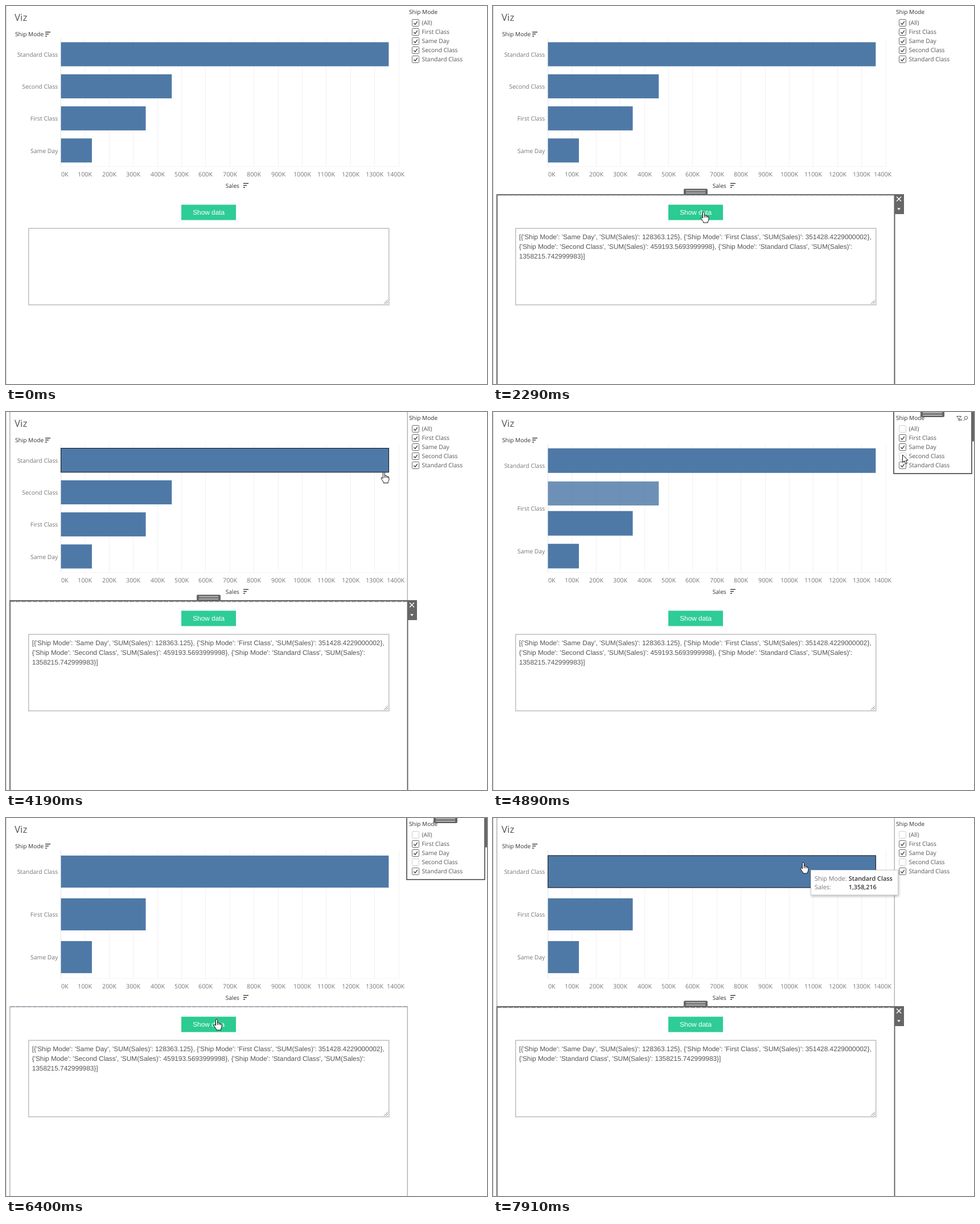
Recreate the animation shown at these times as an HTML page. Size 845x663 px, loop 8 s.

```html
<!DOCTYPE html>
<html lang="en">
<head>
<meta charset="utf-8">
<title>Viz</title>
<style>
  html, body { margin: 0; height: 100%; overflow: hidden; background: #fff; }
  svg { display: block; width: 845px; height: 663px; cursor: default; }
  text { font: 10.4px "Open Sans", "Noto Sans", sans-serif; fill: #767676; text-rendering: geometricPrecision; white-space: pre; }
  .head { font-size: 10.1px; font-weight: 500; fill: #333; }
  .title { font-size: 17px; fill: #555; }
  .axis { font-size: 10.7px; }
  .item { fill: #555; }
  .tip { font-size: 10.8px; }
  .value { font-size: 10.8px; font-weight: 600; fill: #333; }
  .ui { font: 11.85px "Liberation Sans", Arial, sans-serif; fill: #555; }
  .button { fill: #fff; }
</style>
</head>
<body>
<svg viewBox="0 0 845 663"><g id="base"></g><g id="live"></g></svg>
<script>
const LOOP = 8000;
const BAR = '#4e79a7', DARK = '#5c5c5c';
const AXIS_X = 96.5, PER_100K = 42.4, ROWS_TOP = 56.5, ROWS_HEIGHT = 225;

const SELECT_TEXT_PANE = 2170, SHOW_ALL = 2270, UNCHECK = 4750, RELABEL = 4790;
const SHRINK_START = 4800, SHRINK_END = 5300, RESELECT_TEXT_PANE = 6820, SHOW_FILTERED = 6920;
const TOOLTIP = 7860;

const sales = [
  ['Standard Class', 1358215.743], ['Second Class', 459193.569],
  ['First Class', 351428.423], ['Same Day', 128363.125]
];
const removed = 1;
const filterItems = ['(All)', 'First Class', 'Same Day', 'Second Class', 'Standard Class'];
const allRows = [
  "[{'Ship Mode': 'Same Day', 'SUM(Sales)': 128363.125}, {'Ship Mode': 'First Class', 'SUM(Sales)': 351428.4229000002},",
  "{'Ship Mode': 'Second Class', 'SUM(Sales)': 459193.5693999998}, {'Ship Mode': 'Standard Class', 'SUM(Sales)':",
  "1358215.742999983}]"
];
const filteredRows = [allRows[0], "{'Ship Mode': 'Standard Class', 'SUM(Sales)': 1358215.742999983}]"];

// Pointer stops: time, x, y, and whether the move towards it is linear
const stops = [
  [770, 1, 170], [1050, 468, 527], [1260, 468, 527], [1900, 370, 361],
  [3090, 370, 361], [3460, 546, 174], [3700, 546, 174], [4490, 719.5, 73],
  [4510, 719.5, 73], [4530, 719.5, 75], [5280, 719.5, 75], [5490, 526, 216, true],
  [5510, 482, 229, true], [5610, 482, 229], [5670, 416, 245], [5880, 416, 245],
  [6400, 370, 353], [7610, 370, 353], [7910, 545, 78], [LOOP, 545, 78]
];

const pointers = {
  arrow: `<path d="M0 0V13.6L3.2 10.7L5.5 16L8 15L5.7 9.8H9.7Z" fill="#fff" stroke="#111"/>`,
  hand: `<path d="M-1.5 1.5Q-1.5 0 0 0T1.5 1.5V6Q4 5 4.3 7Q6.5 6.2 6.8 8Q9 7.6 9 9.5V13Q9 15 7.5 17V19H-.5V17.5L-4.3 12Q-5.5 9.7-3.8 9.5Q-2.8 9.5-1.5 11Z" fill="#fff" stroke="#111"/>
    <path d="M1.5 6V10M4.2 7V10M6.8 8V10.5" stroke="#111"/>`,
  beam: `<path d="M-3-8H3M0-8V8M-3 8H3" stroke="#333"/>`
};

const clamp = u => Math.max(0, Math.min(1, u));
const mix = (a, b, u) => a + (b - a) * u;
const smooth = u => u * u * (3 - 2 * u);
const easeInOut = u => u < .5 ? 2 * u * u : 1 - 2 * (1 - u) ** 2;
const inside = (p, x0, y0, x1, y1) => p && p.x >= x0 && p.x <= x1 && p.y >= y0 && p.y <= y1;

const text = (x, y, str, cls = '', anchor = 'start') =>
  `<text x="${x}" y="${y}" class="${cls}" text-anchor="${anchor}">${str}</text>`;
const rect = (x, y, w, h, fill, more = '') =>
  `<rect x="${x}" y="${y}" width="${w}" height="${h}" fill="${fill}" ${more}/>`;
const line = (d, color, width = 1, more = '') =>
  `<path d="${d}" fill="none" stroke="${color}" stroke-width="${width}" ${more}/>`;
const sortIcon = (x, y) => line(`M${x} ${y}h9m-9 3.5h6m-6 3.5h3`, '#444', 1.4);

function pointerAt(t) {
  if (t < stops[0][0]) return null;
  const i = stops.findIndex(s => s[0] > t);
  const [t0, x0, y0] = stops[i - 1], [t1, x1, y1, linear] = stops[i];
  const u = (t - t0) / (t1 - t0), e = linear ? u : smooth(u);
  return { x: mix(x0, x1, e), y: mix(y0, y1, e) };
}

function barsAt(t) {
  const u = clamp((t - SHRINK_START) / (SHRINK_END - SHRINK_START)), p = easeInOut(u);
  const pitch = n => ROWS_HEIGHT / n;
  return sales.map(([, amount], i) => {
    const start = pitch(4) * (i + .5);
    const end = i === removed ? start + 30 : pitch(3) * (i - (i > removed) + .5);
    const h = i === removed ? pitch(4) * .75 : mix(pitch(4), pitch(3), p) * .75;
    return {
      x: AXIS_X, y: ROWS_TOP + mix(start, end, p) - h / 2, h,
      w: amount / 1e5 * PER_100K, alpha: i === removed ? 1 - u : 1
    };
  });
}

function rowLabels(t) {
  const names = sales.map(s => s[0]).filter((_, i) => t < RELABEL || i !== removed);
  const pitch = ROWS_HEIGHT / names.length;
  return names.map((n, i) => text(91.3, ROWS_TOP + pitch * (i + .5) + 4.3, n, '', 'end')).join('');
}

function checkList(t) {
  return filterItems.map((name, i) => {
    const y = 23.5 + 16 * i, on = t < UNCHECK || (i !== 0 && i !== 3);
    return rect(713.5, y, 12, 12, '#fff', `rx="1" stroke="${on ? '#6a6a6a' : '#cfcfcf'}"`) +
      (on ? line(`M716.3 ${y + 6.2}l2.5 2.7 4-5.6`, '#444', 1.4) : '') +
      text(730.5, y + 9.8, name, 'item');
  }).join('');
}

const hoverFrame = (x, y, w, h) => rect(x, y, w, h, 'none', 'stroke="#b3b3b8" stroke-width="1.5"');
const splitLine = y => line(`M7 ${y}H705`, '#9292a0', 1.2, 'stroke-dasharray="8 2"');
const grip = (x, y) => rect(x, y, 42, 11, '#666', 'rx="2"') +
  line(`M${x + 4} ${y + 3.5}h34m-34 4h34`, '#fff', 1.2);

const textPaneSelection = () =>
  rect(7, 331, 698.5, 340, 'none', `stroke="${DARK}" stroke-width="1.8"`) + grip(335, 320.5) +
  rect(705, 330, 17, 35, '#666') + line('M709 334.5l8 8m0-8l-8 8', '#fff', 1.4) +
  '<path d="M710 354.5h6l-3 3.5z" fill="#fff"/>';

const filterSelection = () =>
  rect(704, -5, 137, 113, 'none', `stroke="${DARK}" stroke-width="1.8"`) + grip(751, -2) +
  rect(842, -1, 4, 52.5, '#666');

const filterIcons = () =>
  line('M814.5 7.5h8l-3 3.7v4l-2-1.6v-2.4zM820.5 12l3.5 3.5m0-3.5l-3.5 3.5M829.5 12.5l-3 3', '#555') +
  '<circle cx="831" cy="10.3" r="2.7" fill="none" stroke="#555"/>';

const tooltip = () =>
  rect(558.5, 91.5, 153, 43.5, '#fff', 'stroke="#ccc" style="filter:drop-shadow(1px 2px 2px #0004)"') +
  text(565, 109.7, 'Ship Mode:', 'tip') + text(624.8, 109.7, 'Standard Class', 'value') +
  text(565, 125.3, 'Sales:', 'tip') + text(624.8, 125.3, '1,358,216', 'value');

function staticParts() {
  let out = line('M.5 0V663', '#cfcfcf') + text(15, 25.8, 'Viz', 'title') +
    text(16, 53, 'Ship Mode', 'head') + sortIcon(69, 45.7) +
    text(385.7, 318.8, 'Sales', 'head') + sortIcon(417, 311.2) +
    text(708, 14.3, 'Ship Mode', 'head');
  for (let i = 0; i <= 14; i++) {
    const x = Math.floor(AXIS_X + i * PER_100K) + .5;
    const label = i ? i * 100 + 'K' : '0K';
    const labelX = i === 0 ? 103.3 : i === 14 ? 684.6 : x;
    out += line(`M${x} 57V282`, i ? '#f1f1f1' : '#e4e4e4') + text(labelX, 298.7, label, 'axis', 'middle');
  }
  return out + line('M96 281.5H690', '#f4f4f4');
}

function render(t) {
  const p = pointerAt(t), bars = barsAt(t);
  const overViz = inside(p, 6, 0, 705, 330.9), overText = inside(p, 6, 331, 705, 663);
  const overFilter = inside(p, 705.1, 0, 841, 108);
  const overButton = inside(p, 308, 348, 404, 375), overArea = inside(p, 40, 390, 672, 524);
  const hot = bars.find(b => b.alpha > .5 && inside(p, b.x, b.y, b.x + b.w, b.y + b.h));
  const filterSelected = t >= UNCHECK && t < RESELECT_TEXT_PANE;
  const textSelected = t >= SELECT_TEXT_PANE && !filterSelected;
  const rows = t < SHOW_ALL ? [] : t < SHOW_FILTERED ? allRows : filteredRows;

  let out = bars.map(b => rect(b.x, b.y, b.w, b.h, BAR,
    `opacity="${b.alpha}"` + (b === hot ? ' stroke="#111"' : ''))).join('');
  out += rowLabels(t) + checkList(t);

  out += rect(308, 348.5, 96, 27, overButton ? '#2bcb92' : '#2ecc97') +
    text(356.2, 366.3, 'Show data', 'ui button', 'middle') +
    rect(39.7, 390, 633, 134.2, '#fff', 'stroke="#bdbdbd" stroke-width="1.5"') +
    line('M664 522.5l7-7m-3.5 7l3.5-3.5', '#777') +
    rows.map((r, i) => text(45.7, 408.8 + 17 * i, r, 'ui')).join('');

  if (overViz) out += hoverFrame(6.8, -2, 698.5, 333.5);
  if (overText) out += hoverFrame(6.8, 331, 698.5, 340);
  if (overFilter) out += hoverFrame(704, -5, 137, 113) + filterIcons();
  if (textSelected) out += textPaneSelection();
  if (filterSelected) out += filterSelection();
  if (overViz) out += splitLine(textSelected ? 332.7 : 331.3);
  if (overText) out += splitLine(textSelected ? 332 : 330.8);

  if (t >= TOOLTIP) out += tooltip();
  if (p) {
    const kind = overButton || hot ? 'hand' : overArea ? 'beam' : 'arrow';
    out += `<g transform="translate(${p.x} ${p.y})">${pointers[kind]}</g>`;
  }
  live.innerHTML = out;
}

const base = document.getElementById('base'), live = document.getElementById('live');
base.innerHTML = staticParts();
const began = performance.now();
function tick() {
  render((performance.now() - began) % LOOP);
  requestAnimationFrame(tick);
}
tick();
</script>
</body>
</html>
```
